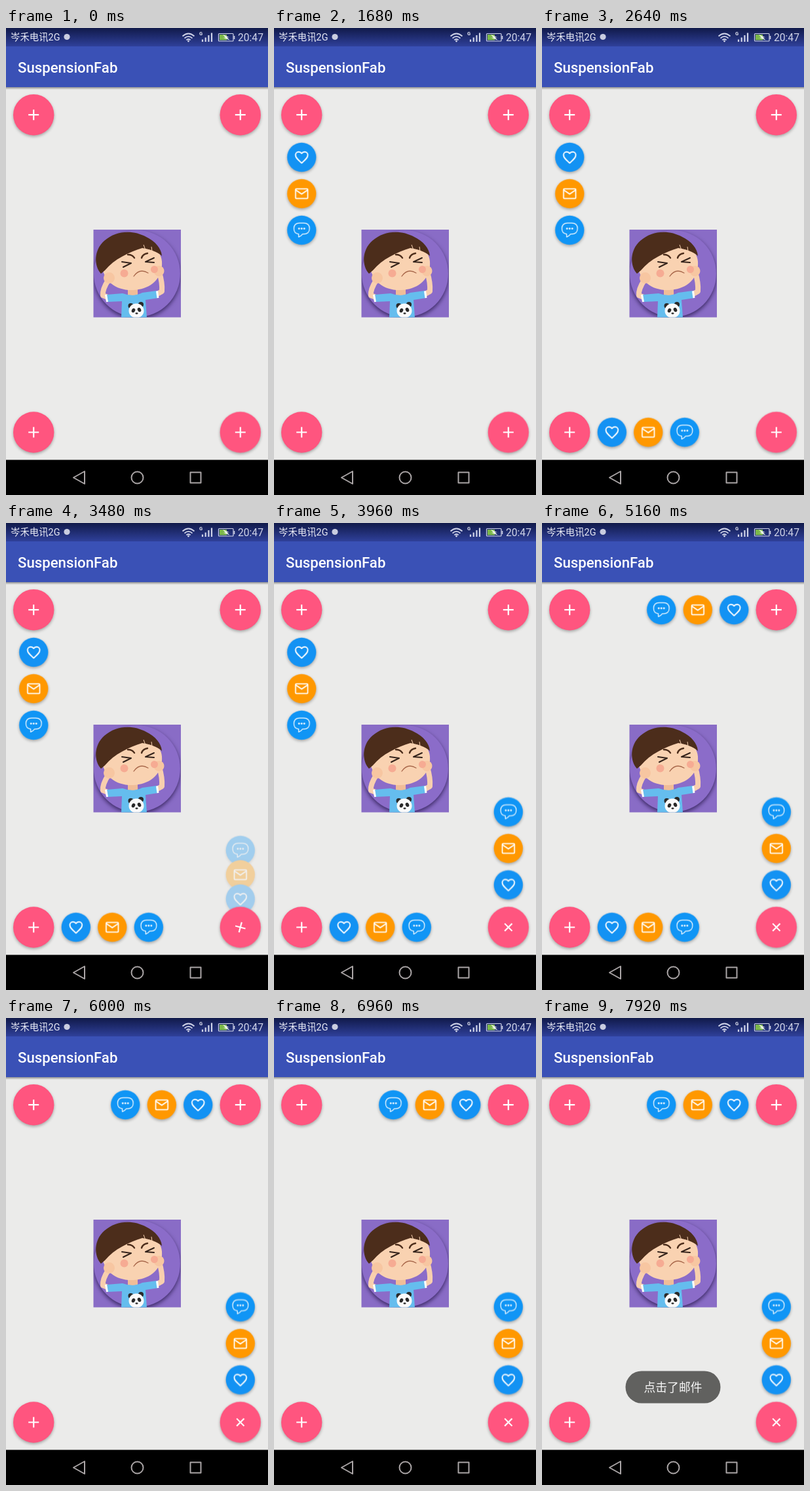
An HTML page that plays this animation: 400x711 px, repeating every 8 s.

```html
<!DOCTYPE html>
<html lang="zh">
<head>
<meta charset="utf-8">
<title>SuspensionFab</title>
<style>
html, body { margin: 0; width: 100%; height: 100%; overflow: hidden; background: #ebebea; }
svg { display: block; width: 100%; height: 100%; }
text { font-family: Roboto, "Noto Sans CJK SC", "Noto Sans CJK", sans-serif; }

.shade { filter: drop-shadow(0 2.5px 2px rgba(0, 0, 0, .3)); }
.line { fill: none; stroke: #fff; }
.round { stroke-linecap: round; stroke-linejoin: round; }

/* Each menu opens along its own direction (--x, --y). */
.tl { --x: 0; --y: 1; --move: tl; }
.bl { --x: 1; --y: 0; --move: bl; }
.br { --x: 0; --y: -1; --move: br; }
.tr { --x: -1; --y: 0; --move: tr; }
.menu use {
  --out: translate(calc(var(--x) * var(--d)), calc(var(--y) * var(--d)));
  transform: var(--out);
  animation: var(--move) 8s infinite;
}
.menu .a { --d: 64.6px; }
.menu .b { --d: 120px; }
.menu .c { --d: 175.6px; }
.br .fade { animation: fade 8s infinite; }
.turn { animation: turn 8s infinite; }
.toast { animation: toast 8s infinite; }

@keyframes tl {
  0%, 16.5% { transform: none; animation-timing-function: steps(3); }
  21% { transform: var(--out); }
  60% { transform: var(--out); animation-timing-function: steps(3); }
  64.5%, 100% { transform: none; }
}
@keyframes bl {
  0%, 28.5% { transform: none; animation-timing-function: steps(3); }
  33% { transform: var(--out); }
  70.5% { transform: var(--out); animation-timing-function: steps(3); }
  75%, 100% { transform: none; }
}
@keyframes br {
  0%, 40.5% { transform: none; animation-timing-function: steps(3); }
  45%, 100% { transform: var(--out); }
}
@keyframes tr {
  0%, 49.5% { transform: none; animation-timing-function: steps(3); }
  54%, 100% { transform: var(--out); }
}
@keyframes fade {
  0%, 40.5% { opacity: 0; animation-timing-function: steps(6); }
  49.5%, 100% { opacity: 1; }
}
@keyframes turn {
  0%, 40.5% { transform: rotate(0deg); animation-timing-function: steps(6); }
  49.5%, 100% { transform: rotate(45deg); }
}
@keyframes toast {
  0%, 87% { opacity: 0; animation-timing-function: steps(4); }
  93%, 100% { opacity: 1; }
}
</style>
</head>
<body>
<svg viewBox="0 0 400 711">
  <defs>
    <linearGradient id="status" x2="0" y2="1">
      <stop offset="0" stop-color="#111a4a"/>
      <stop offset="1" stop-color="#2f409a"/>
    </linearGradient>
    <linearGradient id="edge" x2="0" y2="1">
      <stop offset="0" stop-color="#000" stop-opacity=".38"/>
      <stop offset="1" stop-color="#000" stop-opacity="0"/>
    </linearGradient>
    <clipPath id="frame"><rect x="133.5" y="307" width="133.5" height="133.5"/></clipPath>

    <circle id="fab" class="shade" r="31.2" fill="#ff557f"/>
    <path id="plus" class="line" d="M-8 0H8M0-8V8" stroke-width="2.2"/>
    <g id="heart">
      <circle class="shade" r="22.2" fill="#1392f3"/>
      <path class="line" stroke-width="1.9" stroke-linejoin="round"
        d="M0 8.8C-5.5 4-9.4.8-9.4-3.4C-9.4-6.3-7.2-8.3-4.6-8.3C-2.7-8.3-1-7.4 0-5.9C1-7.4 2.7-8.3 4.6-8.3C7.2-8.3 9.4-6.3 9.4-3.4C9.4.8 5.5 4 0 8.8Z"/>
    </g>
    <g id="mail">
      <circle class="shade" r="22.2" fill="#ff9800"/>
      <rect class="line" x="-9.3" y="-7.4" width="18.6" height="14.8" rx="1.2" stroke-width="1.8"/>
      <path class="line" d="M-9-5.4L0 .6L9-5.4" stroke-width="1.8"/>
    </g>
    <g id="chat">
      <circle class="shade" r="22.2" fill="#1095f5"/>
      <path class="line" stroke-width="1.2" stroke-linejoin="round"
        d="M-4.6 10.4V5.8C-9 5.6-11.8 2.6-11.8-2.4C-11.8-8-8.6-10.8-3-10.8H3C8.8-10.8 12-8 12-2.4C12 3 8.8 5.8 3.2 5.8H1.4C-.2 8-2.2 9.6-4.6 10.4Z"/>
      <g fill="#fff"><circle cx="-4" cy="-2.4" r="1.4"/><circle cy="-2.4" r="1.4"/><circle cx="4" cy="-2.4" r="1.4"/></g>
    </g>
  </defs>

  <rect width="400" height="711" fill="#ebebea"/>

  <!-- bars -->
  <rect y="90" width="400" height="4" fill="url(#edge)"/>
  <rect y="27" width="400" height="63" fill="#3a51b6"/>
  <rect width="400" height="28" fill="url(#status)"/>
  <text x="18" y="68" font-size="22.2" font-weight="500" fill="#fff">SuspensionFab</text>
  <g fill="#e9ebf5">
    <text x="7" y="19" font-size="14.4">岑禾电讯2G</text>
    <circle cx="93" cy="13.5" r="4.6" fill="#c9cde0"/>
    <text x="295" y="10.5" font-size="7.5" font-weight="700">G</text>
    <text x="393" y="20" font-size="15.7" text-anchor="end" fill="#cfd3e8">20:47</text>
  </g>
  <g fill="none" stroke="#cfd3e8" stroke-width="1.8">
    <path d="M269.5 12.5Q278.5 4.5 287.5 12.5M272.5 15.6Q278.5 10.2 284.5 15.6M275.3 18.4Q278.5 15.6 281.7 18.4"/>
    <path d="M300 21V17.5M304.7 21V14.5M309.4 21V11M314 21V7.5" stroke-width="2.2"/>
    <rect x="324.5" y="8.5" width="22.5" height="11.5" rx="1" stroke-width="1.2"/>
    <path d="M348.5 12V17" stroke-width="1.6"/>
  </g>
  <circle cx="278.5" cy="20" r="1.4" fill="#cfd3e8"/>
  <rect x="326" y="10" width="11" height="8.5" fill="#7cb84a"/>
  <path d="M331 10L341 14.2H337.5L341.5 18.5L331.5 14.8H335Z" fill="#e9f2e4"/>

  <rect y="657.5" width="400" height="54" fill="#000"/>
  <g fill="none" stroke="#aaa5a6" stroke-width="2" stroke-linejoin="round">
    <path d="M103 684.5L120 675V694Z"/>
    <circle cx="200.5" cy="684.5" r="9"/>
    <rect x="281.5" y="676.5" width="16" height="16"/>
  </g>

  <!-- picture -->
  <g clip-path="url(#frame)">
    <rect x="133" y="307" width="135" height="135" fill="#896cc6"/>
    <circle cx="200" cy="374" r="66" fill="#8b6cc9" style="filter: drop-shadow(0 3px 3px rgba(35, 20, 70, .75))"/>
    <g class="round" fill="none" stroke="#f8cfae" stroke-width="8">
      <path d="M156 384Q147 398 148 407L158 411"/>
      <path d="M234 372Q239 388 238 401L229 406"/>
    </g>
    <path d="M186 394H201V408H186Z" fill="#f0bd98"/>
    <path d="M154 406L178 404Q194 410 208 403L230 400L232 411L213 414L215 441H176L177 416L155 417Z" fill="#65bdee"/>
    <path d="M152.500 406L154.500 417M230.500 400.500L232 411" stroke="#fff" stroke-width="3"/>
    <path d="M186 403Q194 410 202 403" fill="#f0bd98"/>
    <path d="M146 362C148 345 175 332 205 331C228 330 240 344 238 362C236 385 218 398 194 399C168 400 150 386 146 362Z" fill="#f9d2b1"/>
    <path d="M145 374C134 362 134 338 150 324C168 308 194 307 214 318C228 325 237 335 238 347C230 340 220 337 208 335C188 341 165 352 151 369Z" fill="#4c2d1b"/>
    <path d="M210 330L213 338M222 333L223 340" stroke="#f9d2b1" stroke-width="1"/>
    <circle cx="157.500" cy="380.500" r="8.500" fill="#f7c6a1"/>
    <circle cx="233.500" cy="370" r="8" fill="#f7c6a1"/>
    <circle cx="180.500" cy="373.500" r="6" fill="#f6ab93"/>
    <circle cx="226.500" cy="367.500" r="5.500" fill="#f6ab93"/>
    <g class="round" fill="none" stroke="#35241c" stroke-width="2">
      <path d="M177 356L191 358L179 364M226 350L213 356L226 357"/>
      <path d="M186 345Q193 345 196 350M207 350Q209 344 216 343" stroke="#4c2d1b" stroke-width="2.400"/>
      <path d="M195 378Q204 365 217 373" stroke="#a8674a" stroke-width="1.300"/>
    </g>
    <g fill="#292929">
      <circle cx="190.500" cy="423" r="4"/>
      <circle cx="206" cy="421" r="4"/>
      <ellipse cx="199" cy="430.500" rx="11.500" ry="11" fill="#fafafa"/>
      <ellipse cx="194.500" cy="430" rx="2.600" ry="3.400" transform="rotate(25 194.500 430)"/>
      <ellipse cx="203.500" cy="429" rx="2.600" ry="3.400" transform="rotate(-25 203.500 429)"/>
      <ellipse cx="199.500" cy="434.500" rx="2" ry="1.300"/>
    </g>
  </g>

  <!-- menus -->
  <g class="menu tl" transform="translate(42.2 132.2)">
    <use class="c" href="#chat"/><use class="b" href="#mail"/><use class="a" href="#heart"/>
  </g>
  <g class="menu bl" transform="translate(42.2 615.5)">
    <use class="c" href="#chat"/><use class="b" href="#mail"/><use class="a" href="#heart"/>
  </g>
  <g class="menu br" transform="translate(357.8 615.5)">
    <g class="fade"><use class="c" href="#chat"/><use class="b" href="#mail"/><use class="a" href="#heart"/></g>
  </g>
  <g class="menu tr" transform="translate(357.8 132.2)">
    <use class="c" href="#chat"/><use class="b" href="#mail"/><use class="a" href="#heart"/>
  </g>
  <g transform="translate(42.2 132.2)"><use href="#fab"/><use href="#plus"/></g>
  <g transform="translate(42.2 615.5)"><use href="#fab"/><use href="#plus"/></g>
  <g transform="translate(357.8 132.2)"><use href="#fab"/><use href="#plus"/></g>
  <g transform="translate(357.8 615.5)"><use href="#fab"/><use class="turn" href="#plus"/></g>

  <g class="toast">
    <rect x="127.5" y="537.5" width="145" height="49" rx="24.500" fill="#61615f"/>
    <text x="200" y="569" font-size="17.8" text-anchor="middle" fill="#f6f6f6">点击了邮件</text>
  </g>
</svg>
</body>
</html>
```
